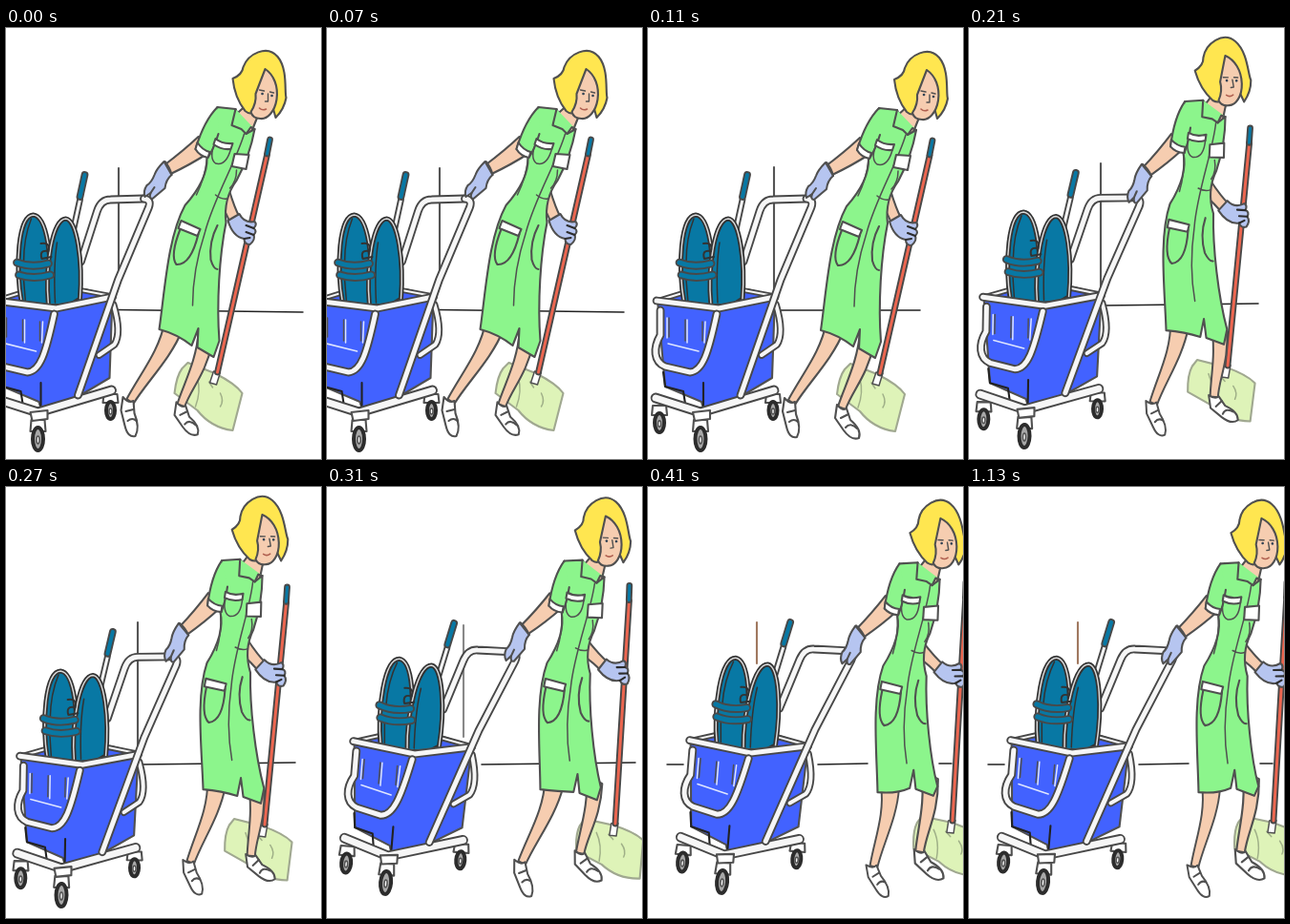
These frames come from a looping animation (330x452 px, 1610 ms). An HTML page:

```html
<!DOCTYPE html>
<html lang="en">
<head>
<meta charset="utf-8">
<title>Cleaner with cart</title>
<style>
html, body { margin: 0; width: 100%; height: 100%; overflow: hidden; background: #fff }
svg { display: block }
.skin { fill: #f6cdb0 }
.glove { fill: #b6c5f0 }
.white { fill: #fff }
.teal { fill: #0878a4 }
.blue { fill: #4262ff }
.green { fill: #8cf58c }
.wheel { fill: #a8a8a8; stroke: #2c2c2c; stroke-width: 4 }
.tube { stroke: #f6f6f6 }
</style>
</head>
<body>
<svg width="330" height="452" viewBox="0 0 330 452" fill="none" stroke="#505050" stroke-width="2.1" stroke-linejoin="round" stroke-linecap="round">
  <path id="upright"/>
  <path id="floor" stroke="#222" stroke-width="1.6"/>

  <g id="cart">
    <!-- wringer lever -->
    <path class="tube" stroke-width="3" d="M92 212L99 180"/>
    <path class="tube" style="stroke:#0878a4" stroke-width="4" d="M99 177L104 154"/>
    <!-- bucket -->
    <path class="blue" d="M10 286L38 276L104 274L133 281L130 367L98 386L58 399L56 392L18 376Z"/>
    <path class="tube" stroke-width="2" d="M36 278L10 286M100 275L132 281"/>
    <!-- push handle, far side -->
    <path class="tube" stroke-width="5" d="M100 245L117 192Q121 180 131 180L166 179"/>
    <!-- wringer -->
    <g stroke="#333">
      <path class="teal" stroke-width="5" d="M38 290C31 250 34 197 50 196C64 197 71 240 67 292Z"/>
      <path stroke="#d8d8d8" stroke-width="1.5" d="M38 289C31 250 34 197 50 196C64 197 71 240 67 290"/>
      <path class="teal" stroke-width="5" d="M66 292C62 250 70 201 84 200C96 201 102 245 99 284L88 291Z"/>
      <path stroke="#d8d8d8" stroke-width="1.5" d="M66 291C62 250 70 201 84 200C96 201 102 245 99 284"/>
      <path stroke-width="1.5" d="M48 200Q40 220 40 246M40 264L42 288M75 225Q71 250 73 288"/>
      <path class="tube" style="stroke:#0878a4" stroke-width="5" d="M33 246Q48 252 66 247M35 259Q50 264 68 259"/>
      <path stroke-width="2" d="M58 226Q68 224 66 234Q56 232 59 242L69 240"/>
    </g>
    <!-- rim, bail and mouldings -->
    <path class="tube" stroke-width="5" d="M9 286L74 294L133 282"/>
    <path stroke="#dfe6ff" stroke-width="1.5" d="M20 304V325M41 306V330M60 308L59 330M21 331L53 339"/>
    <path stroke-width="1.5" d="M22 304V324M39 306V328M57 308V328"/>
    <path class="tube" stroke-width="4" d="M134 290Q143 320 135 332L119 343"/>
    <path class="tube" stroke-width="5" d="M13 296L13 322C5 336 6 350 18 355L44 361C57 360 63 342 72 300"/>
    <path stroke="#222" d="M16 361L18 376L37 381L39 394M58 372L58 399"/>
    <!-- base and casters -->
    <g id="casters"></g>
    <path class="tube" stroke-width="7" d="M8 388L55 403L132 380"/>
    <path class="white" d="M47 403L65 401L65 410L49 412Z"/>
    <!-- push handle, near side -->
    <path class="tube" stroke-width="5" d="M166 179Q174 180 171 188L139 264L97 385"/>
  </g>

  <g id="mop">
    <path fill="#def3b8" stroke="#a0a890" d="M212 352L240 363Q262 374 269 384L259 423Q236 420 222 402L198 384Q200 366 206 358Z"/>
    <path stroke="#a0b088" stroke-width="1.5" d="M222 368Q226 382 220 398M238 378L234 372M246 384Q250 392 246 398"/>
    <path class="white" stroke-width="1.5" d="M239 361L246 362L242 375L235 373Z"/>
    <path class="tube" style="stroke:#ec6650" stroke-width="3" d="M295 134L243 362"/>
    <path class="tube" style="stroke:#0878a4" stroke-width="3" d="M298 118L295 133"/>
  </g>

  <g id="woman">
    <g id="legA">
      <path class="skin" d="M187 308C181 340 162 362 147 390L154 395C168 372 193 348 205 318Z"/>
      <path class="white" d="M143 388Q149 395 154 392L155 405Q161 420 156 429Q148 431 145 418L141 402Z"/>
      <path d="M146 403L154 401M148 413Q153 409 157 413"/>
    </g>
    <g id="legB">
      <path class="skin" d="M222 318C220 350 206 375 199 397L207 400C214 380 230 365 237 330Z"/>
      <path class="white" d="M198 395Q204 402 208 399L212 411Q224 421 221 430Q213 433 205 422L196 409Z"/>
      <path d="M202 409L210 405M207 419Q212 413 219 420"/>
    </g>
    <!-- arms -->
    <path class="skin" d="M222 115Q206 130 186 145L193 154Q214 144 231 133Z"/>
    <path class="glove" d="M186 141L194 155Q188 160 187 169L174 180Q170 180 172 174L166 178Q164 172 168 166Q173 163 176 155Q178 149 186 141Z"/>
    <path d="M172 174L176 168M187 141Q192 147 194 155"/>
    <g id="arm">
      <path class="skin" d="M254 170Q260 190 265 199L255 205Q252 196 244 184Z"/>
      <path class="glove" d="M253 203L265 196Q270 206 281 204Q284 207 280 211Q284 214 280 218Q282 223 276 228Q270 228 270 222Q258 220 253 203Z"/>
      <path stroke="#2c2c2c" d="M272 208L280 211M272 215L280 218M270 222L276 221"/>
    </g>
    <!-- neck and dress -->
    <path class="skin" d="M272 82L261 92L268 110L276 114L284 94Z"/>
    <path id="dress" class="green"/>
    <path class="green" d="M242 84Q228 98 219 128L232 137Q238 128 243 112"/>
    <path class="white" d="M221 121Q226 129 234 131L232 137Q223 135 219 128Z"/>
    <path class="green" d="M261 86L257 103L267 107L272 112L277 105L281 107"/>
    <path stroke-width="1.5" d="M270 112C262 140 238 180 229 215Q216 255 216 292M231 138Q229 158 220 176M240 176Q246 181 252 180M262 150Q262 162 255 169"/>
    <path stroke-width="1.5" d="M239 122Q233 138 240 143Q251 146 256 128"/>
    <path class="white" d="M240 117Q247 123 258 122L256 128Q246 129 238 123Z"/>
    <path class="white" d="M260 133L275 134L272 149L257 146Z"/>
    <path d="M203 212Q192 240 199 249Q214 250 222 217"/>
    <path class="white" d="M204 203L224 212L221 219L201 211Z"/>
    <path d="M242 208Q233 225 235 244Q238 254 242 254"/>
    <!-- head -->
    <path fill="#ffe650" d="M258 54Q268 50 269 42C274 28 294 18 305 31C316 44 312 68 314 74Q312 86 303 95L300 84L281 88Q277 93 271 88Q260 74 258 54Z"/>
    <path class="skin" d="M277 89Q283 80 282 70L292 44C301 50 306 62 304 76C302 89 294 97 287 96Q279 96 277 89Z"/>
    <path stroke-width="1.4" d="M286 66L291 67M297 68L301 69M295 70L295 78L292 78"/>
    <path stroke="#345" stroke-width="2.6" d="M289 70h.1M299 72h.1"/>
    <path stroke="#b06050" stroke-width="1.6" d="M286 85Q289 88 293 86"/>
  </g>
</svg>
<script>
const el = id => document.getElementById(id);
const LOOP = 1610;
const CART = [56, 432], MOP = [243, 362], HEM = [182, 314];
const HIP_A = [196, 322], HIP_B = [230, 338], ELBOW = [252, 172];

// cart, mop and body: [x, y, angle]; legs: [step, angle, scale]; arm: angle; lift raises the hem.
const poses = [
  { at: 0, cart: [34.5, 432, 0], mop: [221.5, 361, 0], body: [161.5, 313, 0],
    legA: [0, 0, 1], legB: [0, 0, .97], arm: 0, lift: 0,
    upright: 'M118 147V258', floor: 'M115 295.5L311 298', line: '#555' },
  { at: 110, cart: [56, 432, 0], mop: [243, 362, 0], body: [182, 314, 0],
    legA: [0, 0, 1], legB: [0, 0, 1], arm: 0, lift: 0,
    upright: 'M132 146V290', floor: 'M138 296H285', line: '#555' },
  { at: 210, cart: [59, 429, 1], mop: [271, 354, -7.3], body: [207, 314, -10],
    legA: [0, -1.5, .95], legB: [8, -6, .96], arm: -7, lift: 4,
    upright: 'M138 142V290', floor: 'M142 291L303 289', line: '#555' },
  { at: 310, cart: [62.5, 416, 4.7], mop: [302, 353, -9.3], body: [224, 314, -8.7],
    legA: [0, 1, .98], legB: [9, 0, 1], arm: -13, lift: 9,
    upright: 'M143 145V262', floor: 'M162 291L323 289', line: '#888' },
  { at: 410, cart: [78.5, 415, 4.7], mop: [319, 350, -9.5], body: [241, 317, -9.2],
    legA: [0, -9, .93], legB: [9, -3, 1.03], arm: -12, lift: 16,
    upright: 'M114 142V185', floor: 'M20 291H37M178 291L230 290M305 290H318', line: '#a07860' }
];

const place = (id, [px, py], [x, y, angle], scale = 1) => el(id).setAttribute('transform',
  `translate(${x} ${y}) rotate(${angle}) scale(${scale}) translate(${-px} ${-py})`);

const swing = (id, [x, y], [step, angle, scale], lift = 0) =>
  place(id, [x, y], [x + step, y - lift, angle], scale);

const dressPath = lift => `M261 86L242 84Q230 105 231 137Q232 160 208 187C190 220 187 275 181 317
  Q200 322 215 ${334 - lift}L222 ${316 - lift}L221 ${336 - lift}L238 ${346 - lift}L244 ${329 - lift / 2}
  C241 290 244 240 251 205Q248 180 262 161Q276 135 281 107L272 112Z`;

function show(p) {
  place('cart', CART, p.cart);
  place('mop', MOP, p.mop);
  place('woman', HEM, p.body);
  swing('legA', HIP_A, p.legA);
  swing('legB', HIP_B, p.legB, p.lift);
  swing('arm', ELBOW, [0, p.arm, 1]);
  el('dress').setAttribute('d', dressPath(p.lift));
  el('upright').setAttribute('d', p.upright);
  el('upright').setAttribute('stroke', p.line);
  el('floor').setAttribute('d', p.floor);
}

el('casters').innerHTML = [[12, 414, 5, 10], [55, 431, 5.5, 12], [131, 401, 4.5, 9]].map(([x, y, rx, ry]) =>
  `<path class="white" d="M${x - 7} ${y - ry - 8}h14l1 ${ry}h-16z"/>
   <ellipse class="wheel" cx="${x}" cy="${y}" rx="${rx}" ry="${ry}"/>
   <ellipse class="white" cx="${x}" cy="${y + 1}" rx="1.5" ry="${ry / 3}" stroke-width="1.5"/>`).join('');

// Give every tube a dark edge.
document.querySelectorAll('.tube').forEach(tube => {
  const edge = tube.cloneNode();
  edge.style.stroke = '#484848';
  edge.setAttribute('stroke-width', +tube.getAttribute('stroke-width') + 3.8);
  tube.before(edge);
});

const start = performance.now();
let current;
function tick() {
  const t = (performance.now() - start) % LOOP;
  const pose = poses.findLast(p => p.at <= t) || poses[0];
  if (pose !== current) show(current = pose);
  requestAnimationFrame(tick);
}
tick();
</script>
</body>
</html>
```
